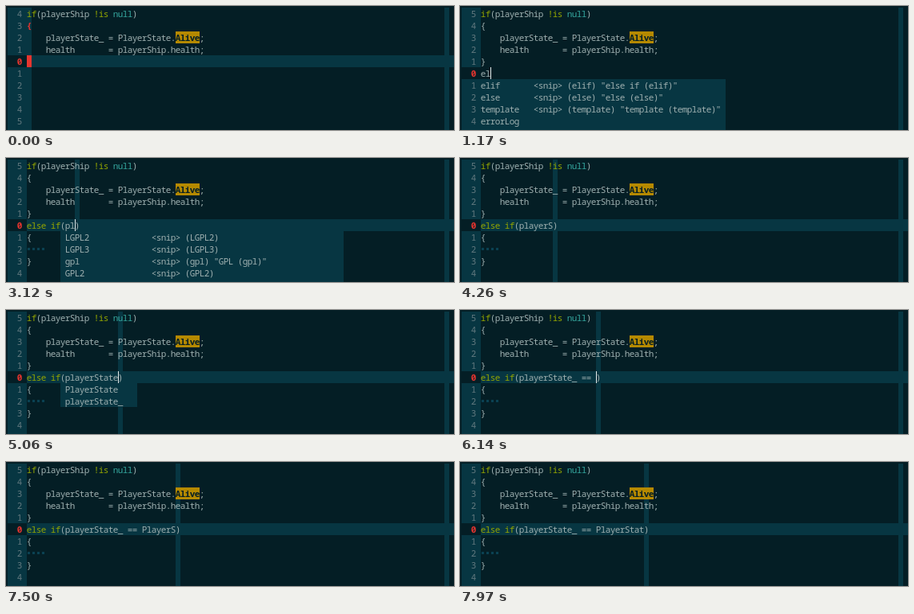
Write an HTML page with a canvas that moves like this. It is 560x156 px and loops after 8000 ms.

```html
<!DOCTYPE html>
<html>
<head>
<meta charset="utf-8">
<style>
  html, body { margin: 0; width: 100%; height: 100%; overflow: hidden; background: #041e25; }
  canvas { display: block; }
</style>
</head>
<body>
<canvas id="stage" width="560" height="156"></canvas>
<script>
const ctx = document.getElementById('stage').getContext('2d');
const LOOP = 8000, CW = 6, LH = 15, LEFT = 26, TOP = 2;
const C = {
  bg: '#041e25', band: '#073642', text: '#9fb0b0', num: '#62797f', red: '#e8352f',
  green: '#94a600', cyan: '#35a79e', mark: '#b58900', dots: '#0a4152', bar: '#e4eaea'
};
const FONT = '11px "Noto Sans Mono", "DejaVu Sans Mono", monospace';

const colX = c => LEFT + c * CW;
const rowY = r => TOP + r * LH;

function rect(x, y, w, h, color) {
  ctx.fillStyle = color;
  ctx.fillRect(x, y, w, h);
}

function print(str, col, row, color = C.text, bold = false) {
  ctx.font = (bold ? 'bold ' : '') + FONT;
  ctx.textAlign = 'center';
  ctx.fillStyle = color;
  [...str].forEach((ch, i) => {
    if (ch !== ' ') ctx.fillText(ch, colX(col + i) + CW / 2, rowY(row) + 12);
  });
}

function code(str, row) {
  print(str.replace(/!is|\b(if|else|null)\b/g, m => ' '.repeat(m.length)), 0, row);
  for (const m of str.matchAll(/!is|\b(if|else|null)\b/g))
    print(m[0], m.index, row, m[0] === 'null' ? C.cyan : C.green);
}

// Completion menu; an item is "word" or "word|snippet description".
function menu(col, ...items) {
  const parts = items.map(s => s.split('|'));
  const wide = Math.max(...parts.map(p => p[0].length));
  const rows = parts.map(([w, d]) => d ? w.padEnd(wide + 3) + '<snip> ' + d : w);
  return { col, rows, width: Math.max(16, ...rows.map(r => r.length + 2)) };
}

const elif = 'elif|(elif) "else if (elif)"';
const template = 'template|(template) "template (template)"';
const status = 'PlayerStatusDescriptor';
const elMenu = menu(0, elif, 'else|(else) "else (else)"', template, 'errorLog', 'health');
const elifMenu = menu(0, elif);
const plMenu = menu(8, 'LGPL2|(LGPL2)', 'LGPL3|(LGPL3)', 'gpl|(gpl) "GPL (gpl)"',
  'GPL2|(GPL2)', 'GPL3|(GPL3)', 'PlayerDiedEvent', template);
const plaMenu = menu(8, 'playerShip', 'PlayerState', template);
const playMenu = menu(8, 'playerShip', 'PlayerState', 'playerState_');
const statMenu = menu(8, 'PlayerState', 'playerState_', status);
const stateMenu = menu(8, 'PlayerState', 'playerState_');
const typeMenu = menu(24, 'PlayerState', 'playerState_', status);

const WORD = 'elif', ARG = 'playerState_ == PlayerStat';
const EXPAND = 2020;

// Each key: text redraw time, time the bar and menu return, typed length, menu.
const keys = [
  [540, 580, 0], [970, 1030, 1], [1130, 1170, 2, elMenu],
  [1320, 1370, 3, elifMenu], [1530, 1580, 4, elifMenu], [1930, 1970, 4],
  [EXPAND, 2070, 0], [2740, 2820, 1], [3080, 3120, 2, plMenu],
  [3260, 3300, 3, plaMenu], [3540, 3580, 4, playMenu], [3660, 3710, 5, playMenu],
  [3870, 3950, 6, playMenu], [4260, 4340, 7, statMenu], [4510, 4560, 8, statMenu],
  [4660, 4700, 9, statMenu], [4810, 4860, 10, statMenu], [5020, 5060, 11, stateMenu],
  [5440, 5490, 12, menu(8, 'playerState_')], [5680, 5720, 13], [5820, 5860, 14],
  [5960, 6000, 15], [6090, 6140, 16], [6330, 6380, 17],
  [6540, 6580, 18, menu(24, 'LGPL2|(LGPL2)', 'LGPL3|(LGPL3)', 'GPL2|(GPL2)', 'GPL3|(GPL3)', 'PlayerInputHandle')],
  [6650, 6700, 19, menu(24, 'PlayerState', 'playerState_', 'PlayerDisconnectedException', status)],
  [6930, 6970, 19], [6970, 7020, 20, typeMenu], [7110, 7150, 21, typeMenu],
  [7230, 7280, 22, typeMenu], [7500, 7540, 23, typeMenu], [7660, 7700, 24, typeMenu],
  [7820, 7860, 25, typeMenu], [7970, 8000, 26]
];

function backdrop(row, column, lineOn) {
  rect(0, 0, 560, 156, C.bg);
  rect(2, 2, 24, 154, C.band);
  rect(2, rowY(row), 24, LH, C.bg);
  rect(548, 2, 6, 154, C.band);
  if (column >= 0) rect(colX(column), 2, CW, 154, C.band);
  if (lineOn) rect(LEFT, rowY(row), 560 - LEFT, LH, C.band);
  for (let r = 0; r < 10; r++)
    print(String(Math.abs(r - row)), -2, r, r === row ? C.red : C.num, r === row);
}

function block(matched) {
  code('if(playerShip !is null)', 0);
  print('{', 0, 1, matched ? C.red : C.text, matched);
  code('    playerState_ = PlayerState.     ;', 2);
  rect(colX(31), rowY(2), 5 * CW, LH, C.mark);
  print('Alive', 31, 2, C.bg, true);
  code('    health       = playerShip.health;', 3);
}

function bar(col, row) {
  rect(colX(col), rowY(row), 1, LH, C.bar);
}

function drawMenu({ col, rows, width }) {
  // At the left edge the menu's padding falls in the gutter, under the numbers.
  const x = Math.max(LEFT, colX(col - 1));
  rect(x, rowY(6), colX(col - 1 + width) - x, rows.length * LH, C.band);
  rows.forEach((s, i) => print(s, col, 6 + i));
}

function intro(t) {
  backdrop(4, 0, true);
  block(true);
  if (t < 40) {
    rect(colX(0), rowY(4), CW, LH, C.red);
  } else {
    print('}', 0, 4, C.red, true);
    if (t >= 80) bar(1, 4);
  }
}

function typing(t) {
  const [, ready, count, popup] = keys.findLast(k => t >= k[0]);
  const expanded = t >= EXPAND;
  const before = expanded ? 'else if(' + ARG.slice(0, count) : WORD.slice(0, count);
  const cursor = before.length;
  const lineOn = t >= 2740 || (t >= 1930 && t < 2070);

  backdrop(5, t >= 1930 ? cursor : -1, lineOn);
  block(false);
  print('}', 0, 4);
  code(before + (expanded ? ')' : ''), 5);
  if (expanded) {
    print('{', 0, 6);
    for (let i = 0; i < 4; i++) rect(colX(i) + 1, rowY(7) + 6, 3, 3, C.dots);
    print('}', 0, 8);
  }
  if (t >= ready) {
    if (popup) drawMenu(popup);
    bar(cursor, 5);
  }
}

function frame(now) {
  const t = now % LOOP;
  if (t < 540) intro(t);
  else typing(t);
  requestAnimationFrame(frame);
}
requestAnimationFrame(frame);
</script>
</body>
</html>
```
